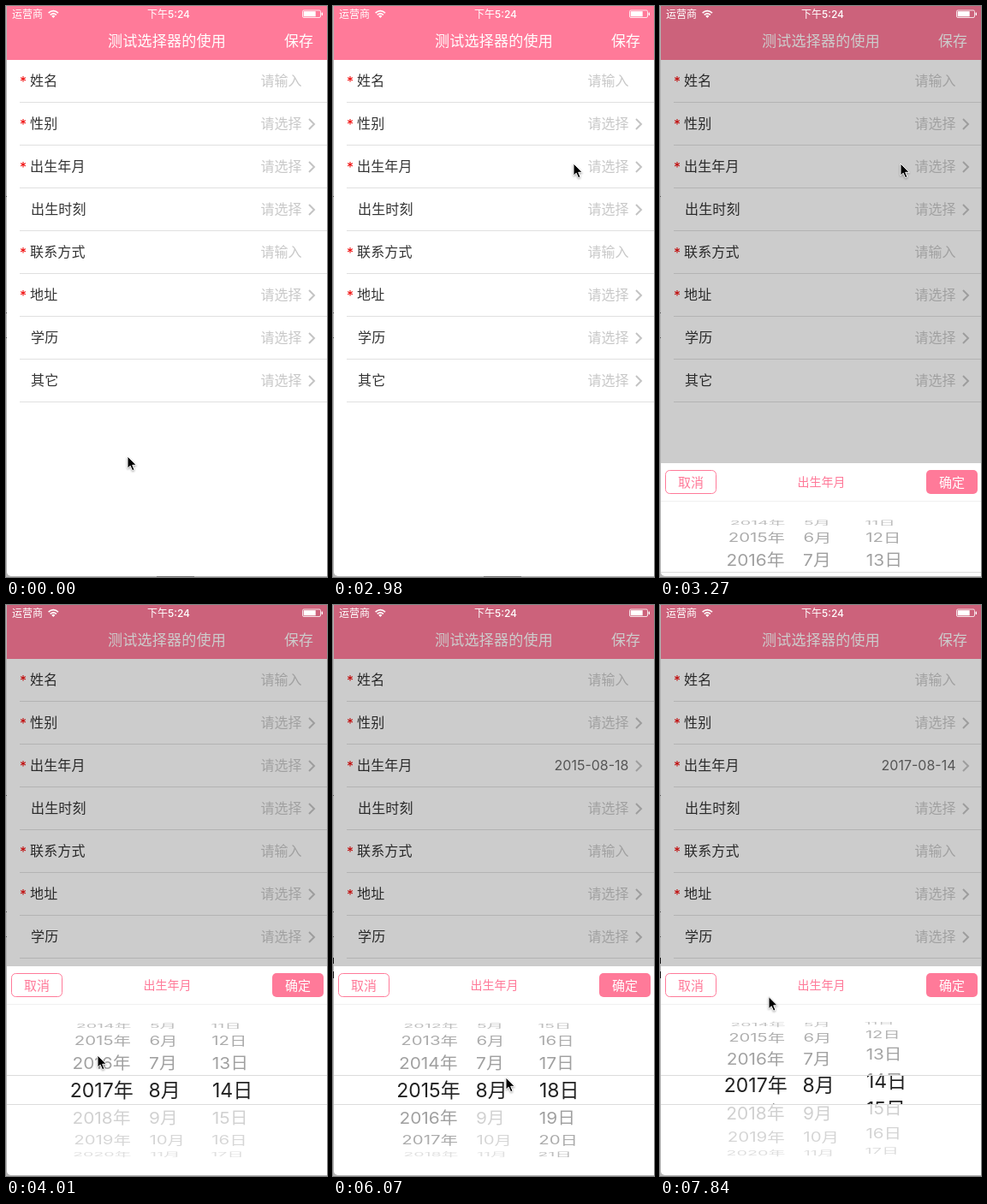
An HTML page that plays this animation: 375x667 px, repeating every 7.99 s.

```html
<!DOCTYPE html>
<html lang="zh-CN">
<head>
<meta charset="utf-8">
<title>选择器</title>
<style>
  html, body { margin: 0; width: 100%; height: 100%; overflow: hidden; background: #fff; }
  svg { display: block; width: 375px; height: 667px; }
  text { font-family: Inter, "Noto Sans CJK SC", "Noto Sans CJK JP", sans-serif; white-space: pre; }
</style>
</head>
<body>
<svg id="stage" viewBox="0 0 375 667">
  <defs>
    <clipPath id="screen"><rect x="1" y="-10" width="390" height="676" rx="5"/></clipPath>
    <clipPath id="band"><rect x="0" y="550" width="375" height="33"/></clipPath>
    <clipPath id="around"><path d="M0 486H375V549H0ZM0 584H375V648H0Z"/></clipPath>
  </defs>
  <rect width="375" height="667" fill="#b4b4b4"/>
  <rect id="handle" x="176" y="666" width="44" height="1" fill="#777"/>
  <path d="M0 222h1v1h-1zM0 358h1v1h-1zM0 387h1v1h-1z" fill="#555"/>
  <path id="edge" d="M0 412h1v7h-1zM0 428h1v8h-1z" fill="#111"/>
  <g clip-path="url(#screen)">
    <rect width="375" height="667" fill="#fff"/>
    <rect width="375" height="63" fill="#ff7a99"/>
    <g id="form"></g>
    <rect id="dim" width="375" height="667" opacity=".2"/>
    <g id="status"></g>
    <g id="sheet">
      <rect y="422" width="375" height="260" fill="#fff"/>
      <rect y="466" width="375" height="1" fill="#f0f0f0"/>
      <rect x="6.5" y="430.5" width="59" height="27" rx="5" fill="none" stroke="#ff7a99"/>
      <rect x="311" y="430" width="60" height="28" rx="5" fill="#ff7a99"/>
      <g id="bar"></g>
      <g id="rows" clip-path="url(#around)"></g>
      <g id="chosen" clip-path="url(#band)"></g>
      <path d="M0 549.5H375M0 583.5H375" stroke="#dcdcdc"/>
    </g>
  </g>
  <path id="cursor" d="M0 0V14.2L3.2 11.2L5.6 16.7L8 15.7L5.7 10.3H10.2Z"
        fill="#000" stroke="#fff" stroke-width="1" style="filter:drop-shadow(0 1px 1px rgba(0,0,0,.35))"/>
</svg>
<script>
const LOOP = 7990, FIRST = 900, STEP = 147.75;
const PINK = '#ff7a99', MIDDLE = 'text-anchor="middle"', END = 'text-anchor="end"';
const $ = id => document.getElementById(id);
const show = (id, on) => { $(id).style.display = on ? '' : 'none'; };
const clamp = u => Math.min(1, Math.max(0, u));
const mix = (a, b, u) => a + (b - a) * u;

// cy is the vertical centre of the text
const text = (str, x, cy, size, fill, extra = '') =>
  `<text x="${x}" y="${Math.round(cy + size * .37)}" font-size="${size}" fill="${fill}" ${extra}>${str}</text>`;

// A star marks a required field, a final > one with a picker
const FIELDS = ['*姓名', '*性别>', '*出生年月>', '出生时刻>', '*联系方式', '*地址>', '学历>', '其它>'];

function field(spec, i) {
  const y = 87 + 50 * i, required = spec[0] === '*', picks = spec.endsWith('>');
  return (required ? text('*', 16, y + 1.5, 16, '#f00000') : '') +
    text(spec.replace(/[*>]/g, ''), required ? 28 : 29, y, 16, '#333', 'letter-spacing=".15"') +
    text(picks ? '请选择' : '请输入', 345.5, y, 16, '#c8c8c8', `${END} id="value${i}"`) +
    (picks ? `<path d="M354 ${y - 5}l6 6l-6 6" fill="none" stroke="#c4c4c4" stroke-width="2"/>` : '') +
    `<rect x="16" y="${y + 25}" width="359" height="1" fill="#e0e0e0"/>`;
}

$('form').innerHTML =
  text('测试选择器的使用', 119, 41, 17, '#fff', 'font-weight="500" letter-spacing=".25"') +
  text('保存', 325, 41, 17, '#fff') + FIELDS.map(field).join('');

$('status').innerHTML =
  text('运营商', 7, 9.5, 12, '#fff') +
  text('下午5:24', 190, 9.5, 12, '#fff', `${MIDDLE} font-weight="500"`) +
  `<path d="M49.6 8.2Q55.3 3 61 8.2M51.7 10.4Q55.3 7.2 58.9 10.4" fill="none" stroke="#fff" stroke-width="1.6"/>
   <path d="M53.2 11.7Q55.3 10 57.4 11.7L55.3 13.9Z" fill="#fff"/>
   <rect x="346.5" y="5" width="21" height="8.5" rx="1.5" fill="none" stroke="#fff" stroke-width=".8"/>
   <rect x="347.7" y="6.2" width="14" height="6.1" fill="#fff"/>
   <rect x="368.6" y="7.6" width="1.4" height="3.4" rx=".6" fill="#fff"/>`;

$('bar').innerHTML =
  text('取消', 36, 444, 15, PINK, MIDDLE) +
  text('出生年月', 188.5, 444, 14, PINK, MIDDLE) +
  text('确定', 341, 444, 15, '#fff', MIDDLE);

// Pointer stops: step, x, y
const STOPS = [
  [-1, 142, 526], [1, 149, 490], [5, 191, 353], [7, 199, 293], [12, 281, 184], [16, 281, 184],
  [21, 107, 526], [25, 108, 604], [26, 108, 605], [29, 258, 592], [33, 258, 480],
  [35, 202, 552], [36, 195, 585], [40, 190, 515], [42, 128, 590], [45, 127, 457.5]
];

function pointer(k) {
  const i = STOPS.findIndex(s => s[0] > k);
  if (i < 0) return STOPS[STOPS.length - 1].slice(1);
  const a = STOPS[i - 1], b = STOPS[i], u = (k - a[0]) / (b[0] - a[0]);
  return [mix(a[1], b[1], u), mix(a[2], b[2], u)];
}

// Each spin glides the wheels to a date; the form shows it from step `report`
const TODAY = [2017, 8, 14];
const SPINS = [
  { from: 22, to: 27, report: 27, date: [2015, 8, 14] },
  { from: 29, to: 34, report: 34, date: [2015, 8, 18] },
  { from: 36, to: 41, report: 41, date: [2015, 10, 18] },
  { from: 42, to: 45, report: Infinity, date: [2019, 10, 18] },
  { from: 45, to: 48.6, report: 46, date: TODAY }
];

function wheelState(k) {
  let pos = TODAY, goal = TODAY;
  for (const { from, to, date } of SPINS.filter(s => s.from <= k)) {
    const glide = 1 - (1 - clamp((k - from) / (to - from))) ** 3;
    pos = pos.map((p, i) => mix(p, date[i], glide));
    goal = date;
  }
  return { pos, goal };
}

const COLUMNS = [
  { unit: '年', x: 145.5, bandX: 148.7, anchor: END, spread: .1 },
  { unit: '月', x: 167, bandX: 166.5, anchor: '', spread: .1, size: 12 },
  { unit: '日', x: 241, bandX: 241, anchor: '', spread: -.2, size: 31 }
];
const wrap = (n, size) => (n - 1 + size) % size + 1;

function wheel({ unit, x, bandX, anchor, spread, size }, pos, limit) {
  let rows = '', chosen = '';
  for (let n = Math.ceil(pos - 3.6); n <= pos + 3.6; n++) {
    const d = n - pos, angle = d * .415, squash = Math.cos(angle);
    const label = (size ? wrap(n, size) : n) + unit;
    const move = `translate(${x + spread * d * d} ${566.7 + 79 * Math.sin(angle)}) scale(${1 - .007 * d * d} ${squash})`;
    rows += `<g transform="${move}" opacity="${.5 + .5 * squash}">` +
      text(label, 0, 0, 21, n > limit ? '#cfcfcf' : '#9c9c9c', anchor) + '</g>';
    if (Math.abs(d) < 1.2) chosen += text(label, bandX, 566.7 + d * 33, 23, '#222', anchor);
  }
  return { rows, chosen };
}

function draw(k) {
  $('cursor').setAttribute('transform', `translate(${pointer(k)})`);

  const open = k >= 15;
  show('dim', open);
  show('sheet', open);
  show('handle', !open);

  const shown = SPINS.filter(s => s.report <= k).pop();
  show('edge', shown);
  $('value2').textContent = shown ? shown.date.map(n => String(n).padStart(2, '0')).join('-') : '请选择';
  $('value2').setAttribute('fill', shown ? '#6a6a6a' : '#c8c8c8');
  if (!open) return;

  $('sheet').setAttribute('transform', `translate(0 ${224 * (1 - clamp((k - 15) / 2))})`);
  const { pos, goal } = wheelState(k);
  // Months and days past today turn selectable once their wheel has moved
  const wheels = COLUMNS.map((column, i) =>
    wheel(column, pos[i], i && goal[i] !== TODAY[i] ? Infinity : TODAY[i]));
  for (const part of ['rows', 'chosen']) $(part).innerHTML = wheels.map(w => w[part]).join('');
}

const start = performance.now();
let drawn = null;
function tick() {
  const t = (performance.now() - start) % LOOP;
  const k = Math.max(-1, Math.floor((t - FIRST) / STEP + .06));
  if (k !== drawn) draw(drawn = k);
  requestAnimationFrame(tick);
}
tick();
</script>
</body>
</html>
```
